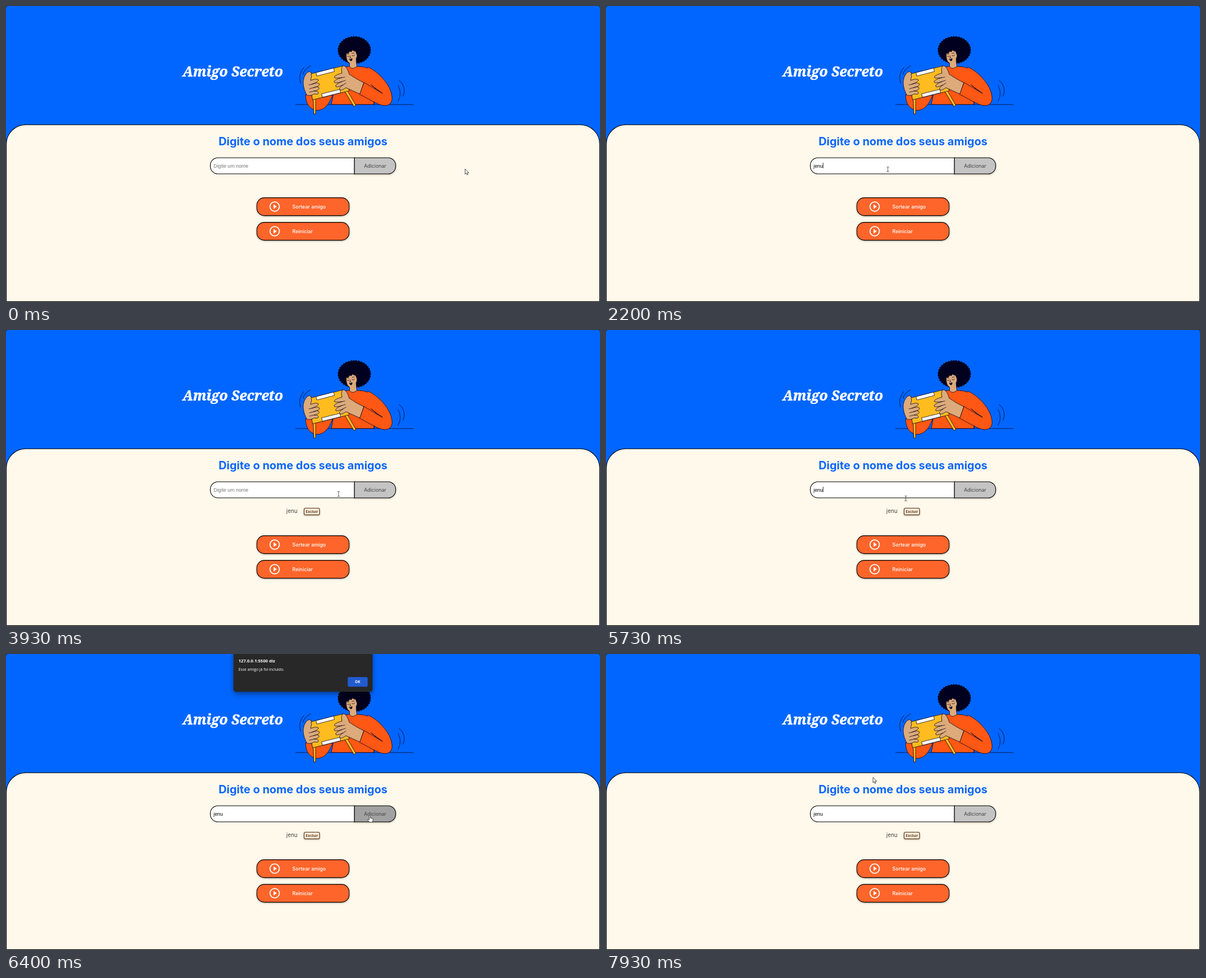
An HTML page that plays this animation: 1059x529 px, repeating every 8000 ms.

```html
<!DOCTYPE html>
<html lang="pt-BR">
<head>
<meta charset="utf-8">
<title>Amigo Secreto</title>
<style>
  html, body { margin: 0; width: 100%; height: 100%; overflow: hidden; background: #0066ff; }
  svg { display: block; width: 100vw; height: 100vh; }
  text { font-family: Inter, sans-serif; font-size: 8.83px; font-optical-sizing: none; white-space: pre; }
  .mid { text-anchor: middle; }
  .title { font: italic 700 24.6px "Noto Serif", serif; fill: #fff; stroke: #fff; stroke-width: .6; }
  .heading { font-size: 19.95px; font-weight: 700; fill: #0b66fa; }
  .field { font-family: "Liberation Sans", Arial, sans-serif; }
  .box { stroke: #000; stroke-width: 1.1; }
  .raised { filter: drop-shadow(.8px 1.6px 1.4px rgba(0, 0, 0, .3)); }
  .white { fill: #fff; }
  .label { fill: #fff; font-weight: 500; }
  .art { stroke: #01001e; stroke-width: .75; stroke-linejoin: round; stroke-linecap: round; }
  .line { fill: none; }
  .skin { fill: #dcaa7b; }
  .orange { fill: #ff5714; }
  .yellow { fill: #ffbc1f; }
  .dialog { filter: drop-shadow(0 4px 5px rgba(0, 0, 0, .4)); }
  .dialog text { font-family: "Open Sans", "Noto Sans", sans-serif; fill: #fff; }
</style>
</head>
<body>
<svg viewBox="0 0 1059 529" preserveAspectRatio="none">
  <defs>
    <g id="action">
      <rect class="box raised" x="447.2" y="342.65" width="164.6" height="32" rx="13.4" fill="#fe652b"/>
      <circle cx="479" cy="358.5" r="8.4" fill="none" stroke="#fff" stroke-width="1.8"/>
      <path class="white" d="M477 354.3 482.8 358.5 477 362.7Z"/>
    </g>
  </defs>

  <rect width="1059" height="529" fill="#0066ff"/>
  <text class="title mid" x="404.5" y="126">Amigo Secreto</text>

  <g class="art">
    <path class="line" d="M516.5 176.1H726"/>
    <path class="line" d="M531 110Q520 122 525 138M543 107Q532 112 529.5 122M699 142Q707 156 699 170M701 133Q715 145 708 161"/>
    <ellipse cx="621" cy="78.8" rx="27.5" ry="22.6" fill="#01001e" stroke-width="4.6" stroke-dasharray="0 4.5"/>
    <path class="orange" d="M534 159Q535 184 554 186.5Q572 187 582 160Z"/>
    <path class="orange" d="M596 112Q608 106 626 108Q648 108 662 121L656 176H580L585 150Z"/>
    <path class="skin" d="M612.5 98V108Q617 115 625.5 108L624 94Z"/>
    <path class="skin" stroke="none" d="M607 85Q611 86 613 81Q616 84 618 79Q621 82 623 81L625.5 88Q625 94 622 97Q619 103 613 102Q606 99 607 85Z"/>
    <path class="line" d="M608.5 90Q610.5 91.5 612 89.5M617 88.5Q619 90.5 621.5 88M608.5 86.5 611.5 85.5M617 84.5 621 84M614 89 613 92.5H615"/>
    <path d="M612.3 95Q615 96 617 93.8Q617.5 98.5 614.5 98Z" fill="#01001e"/>
    <path class="yellow" d="M548 164H552V193H549ZM604 152 608 150 624 178 620.5 179.5Z"/>
    <path class="yellow" d="M538 122.5 601 107 612 151.5 547 167.5Z"/>
    <path class="white" d="M553 119 584 111 585.5 117 554.5 125ZM563 157 595 149 596.5 155 564.5 163Z"/>
    <path class="skin" d="M538 118Q529 126 530 139Q531 151 537 160Q544 161 550 157Q557 159 557 155Q557 152 549 152Q560 150 558 146Q556 143 548 146Q561 143 558.5 139Q556 136 545 140Q558 135 557 132Q554 129 543 133Q546 126 544 119Q541 116 538 118Z"/>
    <path class="line" d="M545 140 540 141M548 146 541 148M549 152 541 154"/>
    <path class="orange" d="M645 109Q661 116 674 132Q686 146 688 161Q690 174 680 177.5Q671 180 655 171L630 157.5 638 136.5 671 156Q660 149 651 141"/>
    <path class="line" d="M651 141Q660 149 671 156M656 171V176"/>
    <path class="skin" d="M637.5 137Q625 131 612 122Q608 108 602 106.5Q596 108 599 120Q587 123 585 127Q585 130 599 128Q584 132 585 136Q587 139 599 135Q586 140 588 144Q590 146 601 141Q593 146 595 149.5Q598 152 606 146Q619 152 630.5 157Z"/>
    <path class="line" d="M599 128 604 127M599 135 605 133M601 141 606 138"/>
  </g>

  <path class="box" d="M.55 528.4V247A34.7 34.7 0 0 1 35.25 212.3H1023.75A34.7 34.7 0 0 1 1058.45 247V528.4Z" fill="#fff9eb"/>
  <path d="M0 0H4Q0 0 0 4ZM1059 0H1055Q1059 0 1059 4ZM0 529V525Q0 529 4 529ZM1059 529V525Q1059 529 1055 529Z" fill="#16243c"/>
  <text class="heading mid" x="529.5" y="249">Digite o nome dos seus amigos</text>

  <path id="add" class="box raised" d="M621 271.2H681.1A13.6 13.6 0 0 1 694.7 284.8V286.4A13.6 13.6 0 0 1 681.1 300H621Z" fill="#c4c4c4"/>
  <text class="mid" x="658" y="289" fill="#444">Adicionar</text>
  <path class="box white" d="M621 271.2V300H377.9A13.6 13.6 0 0 1 364.3 286.4V284.8A13.6 13.6 0 0 1 377.9 271.2Z"/>
  <text id="typed" class="field" x="370" y="288.5"></text>
  <rect id="caret" y="280" width=".8" height="10"/>

  <g id="item">
    <text x="499.8" y="326.8" fill="#444" style="font-size:9.93px">jenu</text>
    <rect class="raised" x="531.5" y="318.5" width="27.4" height="11.9" rx="2.2" fill="#fff0df" stroke="#55310f" stroke-width="1.1"/>
    <text class="mid" x="545.2" y="326.8" fill="#55310f" style="font-size:6.7px;font-weight:600">Excluir</text>
  </g>

  <g id="actions">
    <use href="#action"/>
    <text class="label" x="510.6" y="361.6">Sortear amigo</text>
    <use href="#action" y="44"/>
    <text class="label" x="510.6" y="405.5">Reiniciar</text>
  </g>

  <g id="dialog" class="dialog">
    <rect x="405.5" y="-8" width="248" height="75.6" rx="5" fill="#282828"/>
    <text x="414.5" y="15" style="font-size:7.67px;font-weight:700">127.0.0.1:5500 diz</text>
    <text x="414.5" y="30.3" style="font-size:6.82px">Esse amigo já foi incluido.</text>
    <rect id="ok" x="609.3" y="41.2" width="35.4" height="17.4" rx="2" fill="#215bd0"/>
    <text class="mid" x="626.8" y="52.2" style="font-size:6.6px;font-weight:700">OK</text>
  </g>

  <g id="cursor" stroke-linejoin="round" stroke-linecap="round">
    <path id="arrow" d="M0 0V9L2.1 7.2 3.6 10.4 5 9.8 3.6 6.6H6.4Z" fill="#fff" stroke="#222" stroke-width=".8"/>
    <path id="ibeam" d="M-1.7-4.5Q0-4.5 0-3.6Q0-4.5 1.7-4.5M0-3.6V3.6M-1.7 4.5Q0 4.5 0 3.6Q0 4.5 1.7 4.5" fill="none" stroke="#333" stroke-width=".8"/>
    <path id="hand" d="M-1 1Q0-.8 1 1V5L5 6Q6 6.5 5.8 8.5L4.8 12.6H-.6L-3.6 8.6Q-3.8 7-2.4 7.2L-1 8.2Z" fill="#fff" stroke="#222" stroke-width=".8"/>
  </g>
</svg>

<script>
const LOOP = 8000, FPS = 15;
const $ = id => document.getElementById(id);
const show = (id, on) => { $(id).style.display = on ? '' : 'none'; };
const within = (n, a, b) => n >= a && n < b;

// pointer moves: first tick, last tick, x, y
const START = [818.5, 291.5];
const MOVES = [
  [1, 7, 502.5, 292], [38, 44, 649, 297], [58, 59, 593, 293], [59, 63, 534.5, 301],
  [86, 92, 648.5, 288], [100, 113, 620.5, 48.5], [114, 119, 476, 221]
];
// each focus of the field: click, four key strokes, blur
const FOCUS = [[13, 25, 27, 32, 33, 46], [63, 73, 74, 80, 81, 92]];
const NAME = 'jenu';
const ENDS = [0, 1.96, 6.87, 11.78, 16.69];
const ADDED = 47, OPEN = 94, CLOSE = 114;

function pointer(n) {
  let [x, y] = START;
  for (const [a, b, tx, ty] of MOVES) {
    if (n <= a) break;
    const p = Math.min(1, (n - a) / (b - a));
    const e = p * p * (3 - 2 * p);
    x += (tx - x) * e;
    y += (ty - y) * e;
  }
  return [x, y];
}

function shape(x, y, modal) {
  if (modal || y < 271 || y > 301.5 || x < 363 || x > 695) return 'arrow';
  return x < 621 ? 'ibeam' : 'hand';
}

function drawField(n) {
  const session = FOCUS[n < ADDED ? 0 : 1];
  const keys = session.slice(1, 5).filter(k => n >= k);
  const count = keys.length;
  const focused = within(n, session[0], session[5]);
  const since = n - (count ? keys[count - 1] : session[0]);
  $('typed').textContent = count ? NAME.slice(0, count) : 'Digite um nome';
  $('typed').setAttribute('fill', count ? '#000' : '#757575');
  $('caret').setAttribute('x', 370 + ENDS[count]);
  show('caret', focused && Math.floor(since / 8) % 2 === 0);
}

function draw(t) {
  const n = Math.floor((t + 4) * FPS / 1000);
  const open = within(n, OPEN, CLOSE);
  const [x, y] = pointer(n);
  const kind = shape(x, y, open && n > 100);

  drawField(n);
  show('item', n >= ADDED);
  $('actions').setAttribute('transform', `translate(0 ${n >= ADDED ? 25 : 0})`);

  show('dialog', open);
  $('dialog').style.opacity = Math.min(1, (n - OPEN + 1) / 3);
  const overOk = x > 609 && x < 645 && y > 41 && y < 59;
  $('ok').setAttribute('fill', overOk ? '#4d7bd9' : '#215bd0');
  $('add').setAttribute('fill', open || kind === 'hand' ? '#a1a1a1' : '#c4c4c4');

  for (const k of ['arrow', 'ibeam', 'hand']) show(k, k === kind);
  $('cursor').setAttribute('transform', `translate(${x} ${y})`);
}

const begin = performance.now();
function tick() {
  draw((performance.now() - begin) % LOOP);
  requestAnimationFrame(tick);
}
tick();
</script>
</body>
</html>
```
